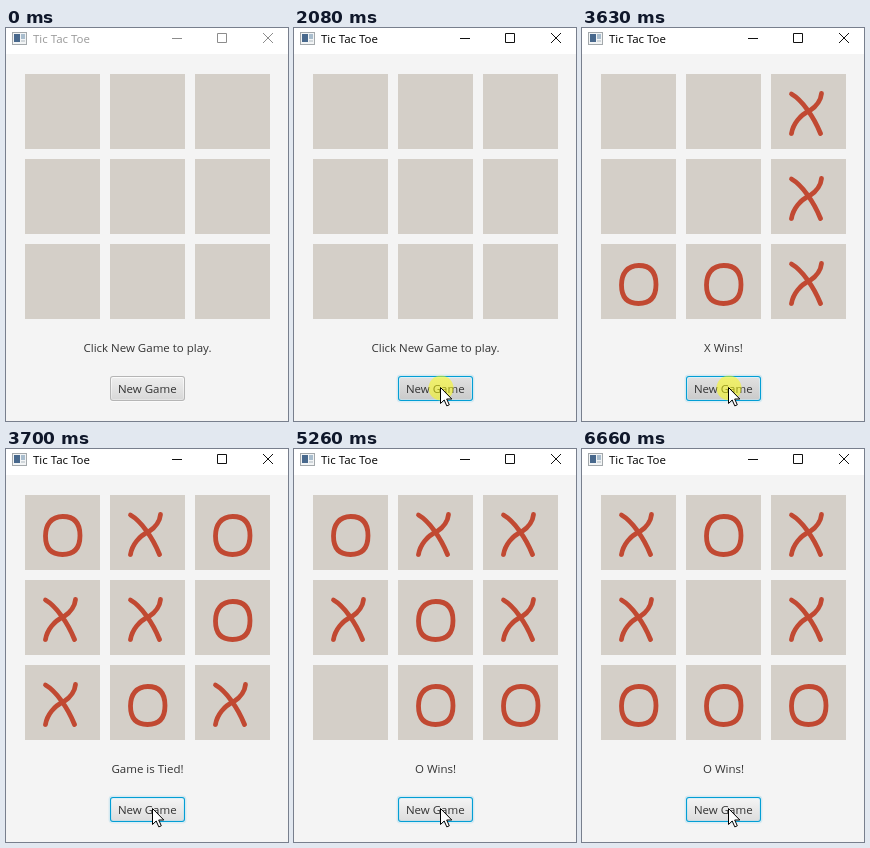
These frames come from a looping animation (282 by 393 pixels, 7.99 s). An HTML page:

```html
<!DOCTYPE html>
<html lang="en">
<head>
<meta charset="utf-8">
<title>Tic Tac Toe</title>
<style>
  html, body { margin: 0; height: 100%; overflow: hidden; background: #f4f4f4; }
  svg { display: block; width: 100vw; height: 100vh; }
  text { font: 11.5px "Open Sans", "Noto Sans", sans-serif; fill: #333; }
  .mid { text-anchor: middle; }
  .mark { fill: none; stroke: #c14932; stroke-width: 4.8; stroke-linecap: round; }
  .controls { fill: none; stroke: currentColor; }
</style>
</head>
<body>
<svg viewBox="0 0 282 393">
  <defs>
    <linearGradient id="body" x2="0" y2="1">
      <stop id="bodyTop"/><stop id="bodyEnd" offset="1"/>
    </linearGradient>
    <linearGradient id="rim" x2="0" y2="1">
      <stop stop-color="#fcfcfc"/><stop offset="1" stop-color="#e4e4e4"/>
    </linearGradient>
    <path id="X" class="mark" d="M20.5 20C31 26 43 43 49.5 59.5M50.5 19.5C50 25 46 32 39 36.5C29 41 22 50 20.5 59.5"/>
    <path id="O" class="mark" d="M37.8 21.5C50 21.5 55 29 55 40.5S50 59.5 37.5 59.5S20.5 52 20.5 41S26 21.5 37.8 21.5Z"/>
  </defs>

  <rect width="282" height="393" fill="#f4f4f4"/>
  <rect width="282" height="26" fill="#fff"/>
  <g id="icon">
    <rect x="6.5" y="4.5" width="14" height="12" fill="#f2f4f5" stroke="#a3a8ab"/>
    <rect x="8" y="6" width="6" height="8" fill="#48688c"/>
    <rect x="15" y="6" width="4" height="5" fill="#a9bdcd"/>
    <rect x="15" y="12" width="4" height="2" fill="#d0d6da"/>
  </g>
  <text id="title" x="27" y="15">Tic Tac Toe</text>
  <path id="controls" class="controls" d="M166 10.5h10M211.5 5.5h9v9h-9zM257 5l10 10M267 5l-10 10"/>

  <g id="board"></g>
  <text id="status" class="mid" x="141.5" y="324"></text>

  <rect x="104" y="349" width="75" height="25" rx="3" fill="#fff" opacity=".6"/>
  <rect id="edge" x="104" y="348" width="75" height="25" rx="3"/>
  <rect x="105" y="349" width="73" height="23" rx="2" fill="url(#rim)"/>
  <rect id="glow" x="102.6" y="346.6" width="77.8" height="27.8" rx="4" fill="#039ed3" opacity=".13"/>
  <rect x="106" y="350" width="71" height="21" rx="1" fill="url(#body)"/>
  <text class="mid" x="141.3" y="365">New Game</text>

  <circle id="click" cx="147" cy="360" r="12.5" fill="#ff0" opacity=".5"/>
  <path id="cursor" d="M.5.5v16l3.7-3.5 2.6 5.9 2.5-1.1-2.6-5.8h5.1z" fill="#fff" stroke="#000"/>
</svg>
<script>
const LOOP = 7990, ENTER = 1070, STEP = 77.5;
// Each click: button pressed, result shown, board, message
const games = [
  [2080, 2160, '..X..XOOX', 'X Wins!'],
  [3630, 3700, 'OXOXXOXOX', 'Game is Tied!'],
  [5180, 5260, 'OXXXOX.OO', 'O Wins!'],
  [6590, 6660, 'XOXX.XOOO', 'O Wins!']
];
const $ = id => document.getElementById(id);
const set = (id, attrs) => {
  for (const key in attrs) $(id).setAttribute(key, attrs[key]);
};
const show = (id, on) => set(id, { visibility: on ? 'visible' : 'hidden' });

let shown;
function drawBoard(board) {
  if (board === shown) return;
  shown = board;
  $('board').innerHTML = [...board].map((mark, i) => {
    const x = 19 + i % 3 * 85, y = 46 + Math.floor(i / 3) * 85;
    return `<g transform="translate(${x} ${y})"><rect width="75" height="75" fill="#d4cfc8"/>` +
      (mark === '.' ? '' : `<use href="#${mark}"/>`) + '</g>';
  }).join('');
}

function render(t) {
  const [, , board, message] = games.findLast(g => t >= g[1]) ||
    [0, 0, '.........', 'Click New Game to play.'];
  drawBoard(board);
  $('status').textContent = message;

  const active = t >= games[0][0];
  const pressed = games.some(g => t >= g[0] && t < g[1]);
  $('title').style.fill = active ? '#000' : '#999';
  $('controls').style.color = active ? '#111' : '#8c8c8c';

  // The pointer glides up in held steps and slows at the button
  const left = 1 - Math.max(0, Math.min(4, Math.floor((t - ENTER) / STEP))) / 4;
  const y = 359 + 28 * left * left;
  show('cursor', t >= ENTER);
  set('cursor', { transform: `translate(${146 + 4 * left} ${y})` });
  show('click', pressed);

  const hover = t >= ENTER && y < 373;
  const [top, end] = pressed ? ['#e0e0e0', '#cbcbcb']
    : hover ? ['#f3f3f3', '#dedede'] : ['#ededed', '#d9d9d9'];
  set('bodyTop', { 'stop-color': top });
  set('bodyEnd', { 'stop-color': end });
  set('edge', { fill: active ? '#039ed3' : '#b5b5b5' });
  show('glow', active);
}

const start = performance.now();
function tick() {
  render((performance.now() - start) % LOOP);
  requestAnimationFrame(tick);
}
tick();
</script>
</body>
</html>
```
